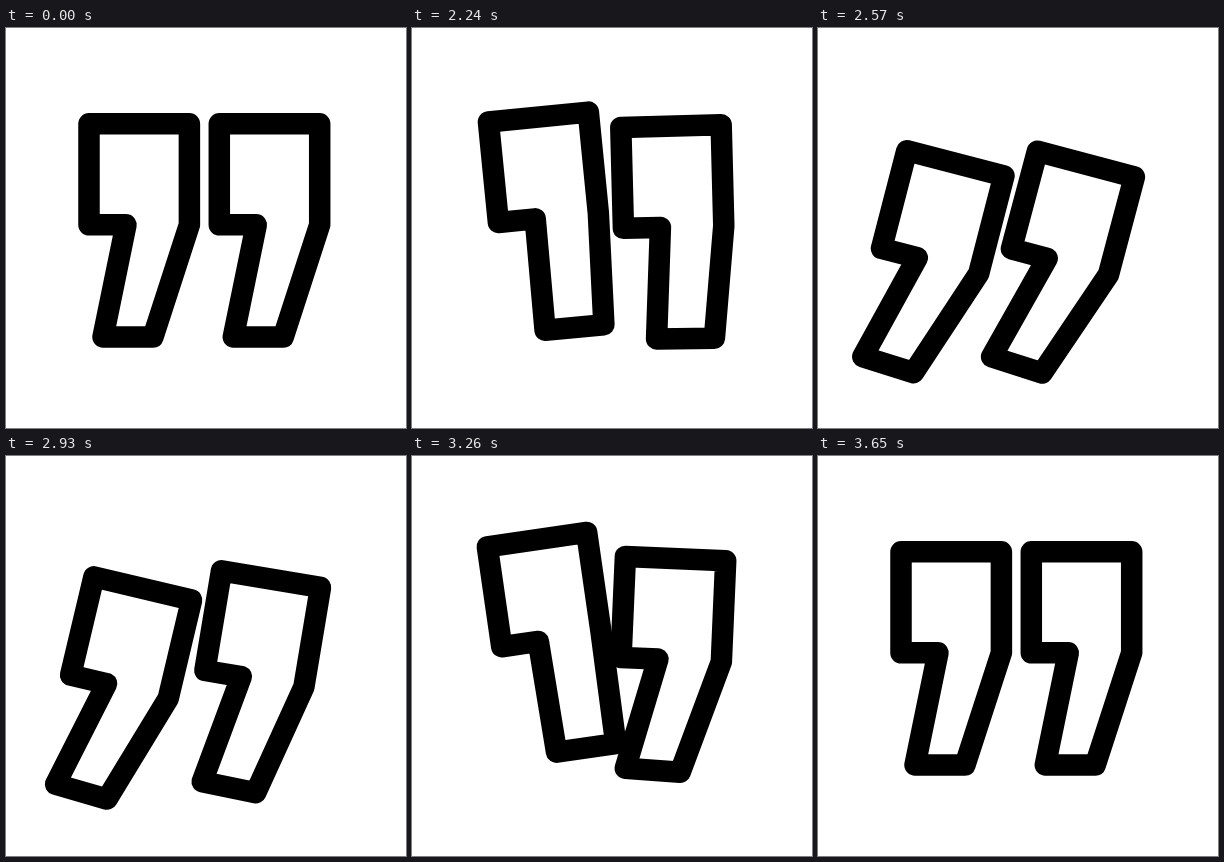
An HTML page for the animation above (3740 ms loop, 400 px wide and 400 px high).

```html
<!DOCTYPE html>
<html lang="en">
<head>
<meta charset="utf-8">
<title>Swinging quotation marks</title>
<style>
  html, body { margin: 0; width: 100%; height: 100%; overflow: hidden; background: #fff; }
  svg { display: block; width: 100%; height: 100%; }
  path { fill: none; stroke: #000; stroke-width: 21.5; stroke-linejoin: round; }
</style>
</head>
<body>
<svg viewBox="0 0 400 400"><path id="left"/><path id="right"/></svg>
<script>
const LOOP = 3740, START = 2030, END = 3650, STEP = 30;

// Pose: shift x, shift y, angle, tail left x, tail left y, tail right x.
// Tail positions are measured from the top left corner of the unrotated head.
const REST    = [0, 0, 0, 14, 213.2, 64];
const FORWARD = [-0.8, -14, -8.8, 40, 213.2, 100];
const BACK    = [-8.6, 38.7, 14.9, 8.5, 210.5, 61.5];
const SETTLE  = [-2.2, 8, 3.1, 7.3, 211.4, 62];

const smooth = p => (1 - Math.cos(Math.PI * p)) / 2;
const cubicIn = p => p ** 3;
const sineOut = p => Math.sin(Math.PI / 2 * p);
const mix = (a, b, p) => a.map((v, i) => v + (b[i] - v) * p);

const LEAVING = mix(BACK, FORWARD, 0.2);

// Each key: time, pose, easing used on the way to it.
const makeTrack = (rest, forward, back, leaving, forwardAgain, settle, stop) => [
  [rest, REST], [forward, FORWARD, smooth], [back, BACK, smooth],
  [leaving, LEAVING, cubicIn], [forwardAgain, FORWARD, sineOut],
  [settle, SETTLE, smooth], [stop, REST, smooth]
];

const quotes = [
  { path: document.getElementById("left"), x: 133.2,
    track: makeTrack(1990, 2125, 2610, 3075, 3295, 3440, 3700) },
  { path: document.getElementById("right"), x: 263.5,
    track: makeTrack(2000, 2090, 2490, 2925, 3145, 3280, 3560) }
];

function poseAt(track, t) {
  if (t < START || t >= END) return REST;
  const next = track.findIndex(key => key[0] > t);
  if (next < 0) return REST;
  const [from, a] = track[next - 1], [to, b, ease] = track[next];
  return mix(a, b, ease((t - from) / (to - from)));
}

function outline(x, [dx, dy, angle, tailLeft, tailLeftY, tailRight]) {
  const c = Math.cos(angle * Math.PI / 180), s = Math.sin(angle * Math.PI / 180);
  const points = [
    [0, 0], [100.4, 0], [100.4, 101], [tailRight, 213.2],
    [tailLeft, tailLeftY], [37, 101], [0, 101]
  ].map(([px, py]) => {
    const u = px - 50.2, v = py - 50.5;
    return [x + dx + u * c - v * s, 146.3 + dy + u * s + v * c];
  });
  return "M" + points.join("L") + "Z";
}

function draw(now) {
  let t = now % LOOP;
  if (t >= START) t = START + Math.floor((t - START) / STEP) * STEP;
  for (const { path, x, track } of quotes) path.setAttribute("d", outline(x, poseAt(track, t)));
}

const begin = performance.now();
function tick() {
  draw(performance.now() - begin);
  requestAnimationFrame(tick);
}
tick();
</script>
</body>
</html>
```
